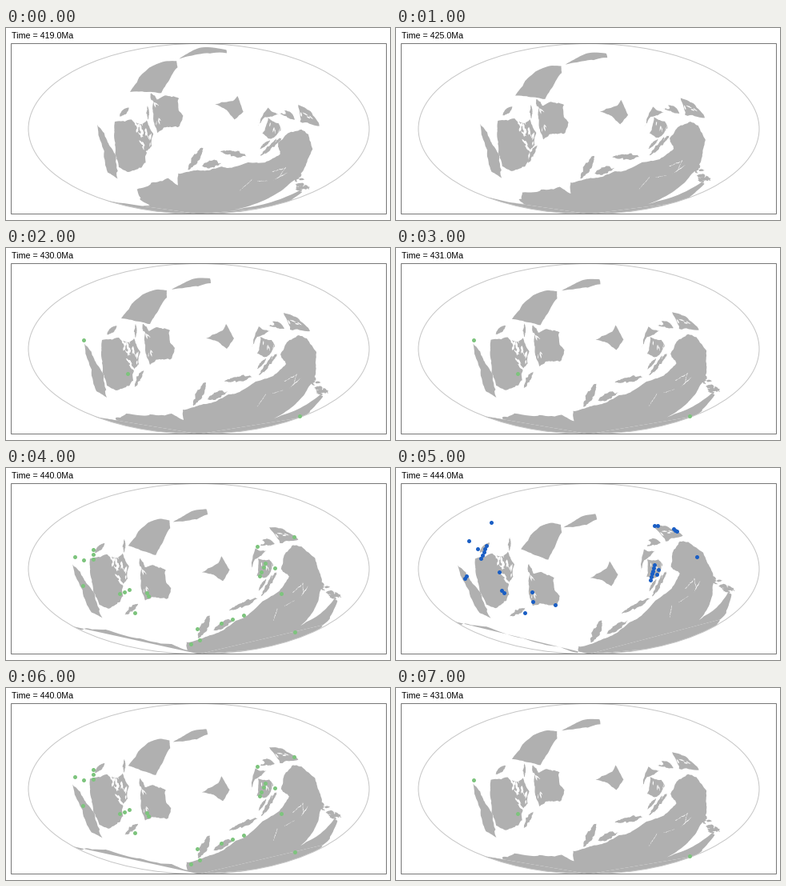
A matplotlib script for the animation above (8 s loop, 480 px wide and 240 px high).

```python
import numpy as np
import matplotlib.pyplot as plt
from matplotlib.animation import FuncAnimation
from matplotlib.patches import Ellipse, Polygon, Rectangle

W, H, DPI = 480, 240, 96
PX = 72 / DPI
CX, CY, RX, RY = 241, 126, 213, 106.5
LAND, GREEN, BLUE = "#b0b0b0", "#7dc47d", "#1a5ec4"
AGES = [419, 425, 430, 431, 440, 444, 440, 431]
rng = np.random.default_rng(7)

# Mollweide latitude for each auxiliary angle
THETA = np.linspace(-np.pi / 2, np.pi / 2, 4001)
LAT = np.arcsin(np.clip((2 * THETA + np.sin(2 * THETA)) / np.pi, -1, 1))


def to_sphere(xy):
    x, y = np.reshape(xy, (-1, 2)).astype(float).T
    theta = np.arcsin(np.clip((CY - y) / RY, -0.999, 0.999))
    lon = np.pi * (x - CX) / (RX * np.cos(theta))
    lat = np.interp(theta, THETA, LAT)
    return np.column_stack([np.cos(lat) * np.cos(lon), np.cos(lat) * np.sin(lon), np.sin(lat)])


def to_stage(lon, lat):
    theta = np.interp(lat, LAT, THETA)
    return np.column_stack([CX + RX * lon / np.pi * np.cos(theta), CY - RY * np.sin(theta)])


def rotate(v, turn):
    angle = np.linalg.norm(turn)
    if angle < 1e-9:
        return v
    k = turn / angle
    return (v * np.cos(angle) + np.cross(k, v) * np.sin(angle)
            + np.outer(v @ k, k) * (1 - np.cos(angle)))


def fit_turn(a, b):
    """Rotation vector that best carries points a to points b."""
    u, _, vt = np.linalg.svd(a.T @ b)
    m = (u @ np.diag([1, 1, np.linalg.det(u @ vt)]) @ vt).T
    angle = np.arccos(np.clip((np.trace(m) - 1) / 2, -1, 1))
    axis = np.array([m[2, 1] - m[1, 2], m[0, 2] - m[2, 0], m[1, 0] - m[0, 1]])
    return axis * angle / max(2 * np.sin(angle), 1e-9)


def rough(p, amount, depth=3):
    """Ragged coast by midpoint displacement on the sphere."""
    for _ in range(depth):
        q = np.roll(p, -1, axis=0)
        step = np.minimum(np.linalg.norm(q - p, axis=1), 0.1)[:, None]
        mid = (p + q) / 2 + rng.normal(0, amount, p.shape) * step
        mid /= np.linalg.norm(mid, axis=1)[:, None]
        p = np.stack([p, mid], axis=1).reshape(-1, 3)
    return p


class Plate:
    """Outlines at 430 Ma; anchors give x, y at 419, 430 and 440 Ma."""

    def __init__(self, *anchors):
        old, ref, young = (to_sphere([a[i:i + 2] for a in anchors]) for i in (0, 2, 4))
        self.old, self.young = fit_turn(ref, old) / 11, fit_turn(ref, young) / 10
        self.shapes = []

    def land(self, *xy, color=LAND, amount=0.08):
        self.shapes.append((rough(to_sphere(xy), amount), color))
        return self

    def lens(self, x0, y0, x1, y1, width, color=LAND):
        t = np.linspace(0, 1, 6)
        side = np.sin(np.pi * t) * width / 2 / np.hypot(x1 - x0, y1 - y0)
        x, y = x0 + (x1 - x0) * t, y0 + (y1 - y0) * t
        dx, dy = side * (y1 - y0), side * (x0 - x1)
        ring = np.vstack([np.column_stack([x + dx, y + dy]),
                          np.column_stack([x - dx, y - dy])[-2:0:-1]])
        return self.land(ring, color=color, amount=0.12)

    def scatter(self, n, start, end, spread, size, width, angle, color="white"):
        """Random lenses strewn along a line."""
        for t in rng.random(n):
            x, y = np.add(start, np.subtract(end, start) * t) + rng.normal(0, spread, 2)
            a, r = np.radians(angle + rng.normal(0, 20)), size * rng.uniform(0.3, 0.6)
            dx, dy = r * np.cos(a), -r * np.sin(a)
            self.lens(x - dx, y - dy, x + dx, y + dy, width * rng.uniform(0.5, 1.2), color)
        return self

    def outlines(self, age):
        turn = self.old * (430 - age) if age < 430 else self.young * (age - 430)
        for shape, _ in self.shapes:
            x, y, z = rotate(shape, turn).T
            lon = np.unwrap(np.arctan2(np.r_[y, y[0]], np.r_[x, x[0]]))
            lat = np.arcsin(np.clip(np.r_[z, z[0]], -1, 1))
            if abs(lon[-1] - lon[0]) > np.pi:  # encircles the south pole
                lon, lat = np.r_[lon, lon[-1], lon[0]], np.r_[lat, [-np.pi / 2] * 2]
            for wrap in (-2 * np.pi, 0, 2 * np.pi):
                yield to_stage(lon + wrap, lat)


north = Plate((216, 39, 207, 52, 208, 68), (277, 31, 256, 43, 253, 57))
north.land(207, 52, 222, 44, 237, 38, 255, 38, 256, 44, 240, 48, 222, 50, amount=0.04)

siberia = Plate((160, 78, 144, 88, 152, 98), (213, 42, 201, 55, 206, 67),
                (188, 82, 178, 94, 185, 108))
siberia.land(144, 88, 154, 76, 157, 70, 171, 58, 188, 52, 201, 53, 201, 62,
             190, 79, 180, 95, 160, 91, amount=0.04)

wedge = Plate((261, 96, 250, 113, 246, 132), (290, 85, 275, 96, 270, 110),
              (286, 115, 277, 126, 270, 141))
wedge.land(250, 113, 271, 103, 275, 95, 285, 113, 276, 126, 265, 117, amount=0.04)

laurentia = Plate((136, 115, 120, 115, 105, 114), (156, 182, 140, 178, 130, 175))
laurentia.land(120, 115, 141, 112, 152, 118, 160, 113, 168, 130, 166, 145, 160, 152,
               159, 166, 150, 174, 138, 178, 126, 172, 121, 152, 119, 130)
laurentia.land(98, 119, 107, 131, 114, 146, 122, 158, 126, 187, 113, 179, 107, 152)
laurentia.lens(126, 108, 139, 97, 6).lens(162, 95, 162, 112, 3)
laurentia.scatter(12, (146, 116), (160, 156), 2.5, 11, 3, 115)
laurentia.scatter(7, (156, 120), (164, 140), 2, 9, 2, 80)

baltica = Plate((193, 88, 182, 101, 177, 120), (205, 123, 196, 140, 192, 165))
baltica.land(174, 106, 188, 99, 205, 103, 205, 118, 211, 125, 206, 139, 192, 139,
             180, 146, 174, 128)
baltica.lens(171, 95, 177, 108, 6).lens(161, 174, 172, 152, 5)
baltica.scatter(5, (177, 108), (181, 136), 2, 8, 1.5, 100)

islands = Plate((328, 101, 316, 98, 312, 99), (345, 125, 336, 124, 333, 122),
                (316, 162, 317, 159, 320, 162))
islands.land(307, 124, 316, 98, 330, 104, 314, 111)
islands.land(318, 111, 332, 115, 336, 123, 326, 136, 314, 132)
islands.lens(316, 159, 339, 132, 6).lens(314, 151, 325, 138, 4).lens(322, 156, 333, 134, 3)
islands.scatter(4, (318, 116), (330, 128), 2, 8, 1.2, 70)

east = Plate((368, 96, 350, 81, 331, 73), (392, 123, 380, 104, 366, 90))
east.land(347, 81, 364, 87, 380, 104, 355, 102)
east.lens(333, 92, 348, 101, 7).lens(328, 97, 345, 98, 3)
east.scatter(4, (354, 92), (370, 100), 2, 9, 1.5, -25)

gondwana = Plate((365, 131, 366, 109, 357, 98), (221, 188, 222, 202, 232, 218),
                 (168, 206, 145, 209, 115, 200))
gondwana.land(117, 212, 138, 216, 137, 212, 150, 207, 180, 208, 207, 207, 222, 215,
              221, 202, 235, 199, 247, 195, 262, 192, 278, 183, 292, 180, 312, 167,
              334, 160, 350, 145, 343, 133, 351, 118, 366, 109, 376, 113, 388, 130,
              387, 142, 387, 158, 376, 178, 362, 195, 335, 213, 368, 200, 393, 183,
              396, 186, 376, 208, amount=0.05)
gondwana.lens(234, 197, 250, 168, 10).lens(251, 189, 277, 179, 9).lens(273, 167, 308, 161, 7)
gondwana.scatter(14, (381, 166), (397, 179), 2.5, 9, 4, -25, LAND)
gondwana.scatter(5, (320, 195), (365, 165), 5, 18, 0.7, 40)

PLATES = [gondwana, islands, east, north, siberia, wedge, laurentia, baltica]


def run(x0, y0, x1=None, y1=None, n=1):
    """Dots evenly spaced along a short line, or a single dot."""
    if x1 is None:
        return [(x0, y0)]
    return list(zip(np.linspace(x0, x1, n), np.linspace(y0, y1, n)))


EARLY = run(97, 115) + run(152, 157) + run(367, 210)
MIDDLE = (run(86, 111, 97, 115, 2) + run(109, 102, 109, 114, 3) + run(142, 157, 154, 152, 3)
          + run(176, 156, 178, 160, 2) + run(324, 119, 317, 135, 4)
          + run(242, 215, 231, 220, 2) + run(269, 194, 297, 184, 3) + run(239, 201)
          + run(96, 147) + run(161, 181) + run(314, 98) + run(360, 86)
          + run(336, 125) + run(344, 157) + run(361, 205))
LATE = (run(113, 97, 106, 113, 5) + run(88, 135, 86, 138, 2) + run(132, 153, 135, 156, 2)
        + run(170, 155, 171, 167, 2) + run(323, 72, 327, 72, 2) + run(347, 76, 351, 79, 3)
        + run(323, 121, 318, 140, 6) + run(328, 127, 326, 133, 2) + run(119, 68)
        + run(91, 91) + run(102, 101) + run(129, 130) + run(161, 181)
        + run(199, 171) + run(376, 111))
DOTS = {430: (EARLY, GREEN), 431: (EARLY, GREEN), 440: (MIDDLE, GREEN), 444: (LATE, BLUE)}

fig = plt.figure(figsize=(W / DPI, H / DPI), dpi=DPI, facecolor="white")
ax = fig.add_axes([0, 0, 1, 1])
ax.set(xlim=(0, W), ylim=(H, 0))
ax.axis("off")
globe = Ellipse((CX, CY), 2 * RX, 2 * RY, fc="none", ec="#c6c6c6", lw=PX, zorder=3)
ax.add_patch(globe)
ax.add_patch(Rectangle((6.5, 19.5), 469, 213, fc="none", ec="#777777", lw=PX,
                       snap=False, zorder=4))
label = ax.text(6.8, 13, "", family="Liberation Sans", size=8, va="baseline")
dots, = ax.plot([], [], "o", ms=5 * PX, mew=0, zorder=5)
patches = []
for plate in PLATES:
    for color in [c for _, c in plate.shapes for _ in range(3)]:
        patch = ax.add_patch(Polygon([(0, 0)] * 3, fc=color, ec="none", zorder=2))
        patch.set_clip_path(globe)
        patches.append(patch)


def draw(i):
    age = AGES[i]
    label.set_text(f"Time = {age:.1f}Ma")
    outlines = [o for plate in PLATES for o in plate.outlines(age)]
    for patch, outline in zip(patches, outlines):
        patch.set_xy(outline)
    points, color = DOTS.get(age, ([], GREEN))
    dots.set_data([p[0] for p in points], [p[1] for p in points])
    dots.set_color(color)
    return [label, dots, *patches]


anim = FuncAnimation(fig, draw, frames=len(AGES), interval=1000, repeat=True, repeat_delay=0)
plt.show()
```
